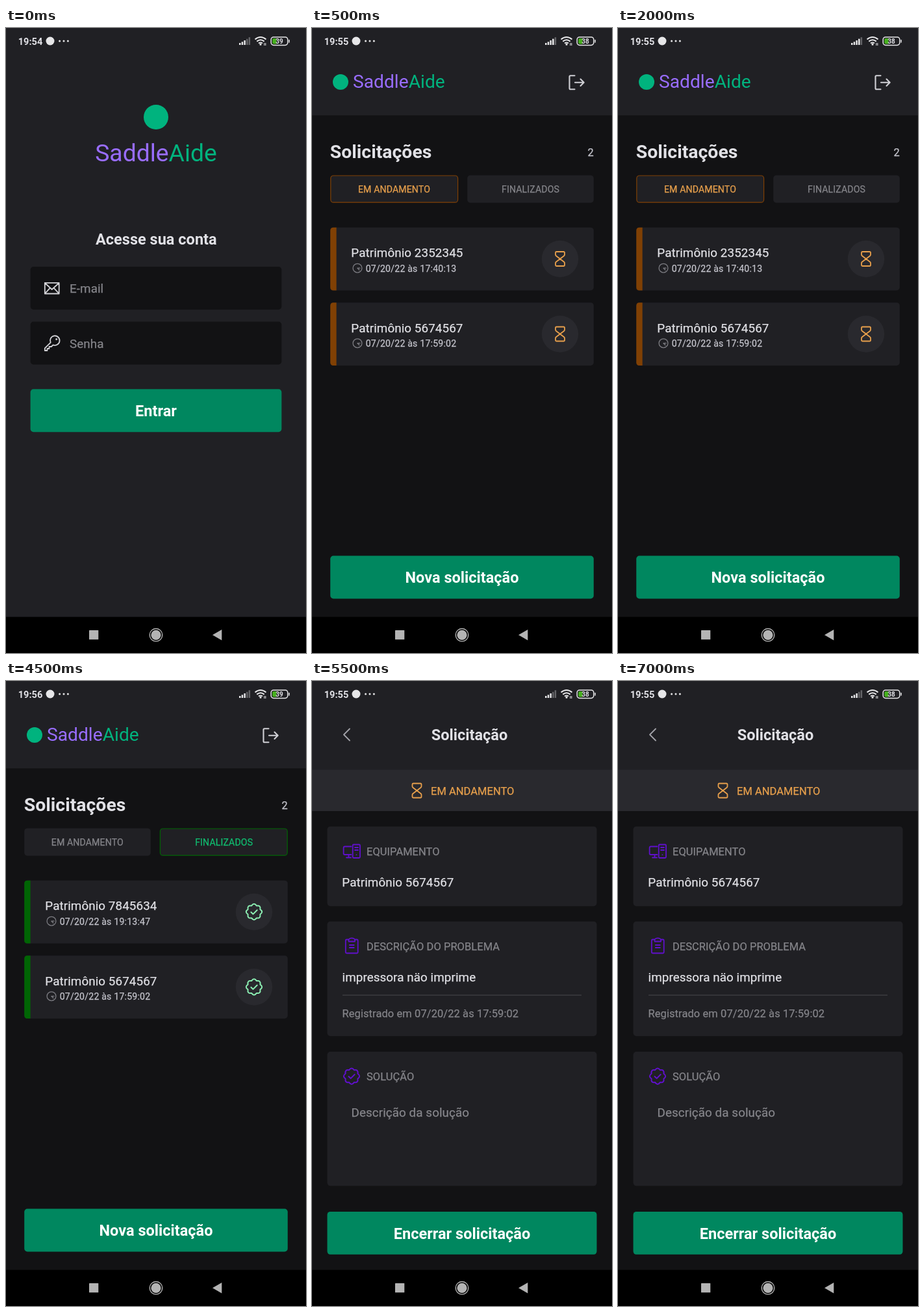
Animation, 462 px wide and 961 px high, one loop 8 s. Source, as an HTML page:

```html
<!DOCTYPE html>
<html lang="pt-BR">
<head>
<meta charset="utf-8">
<title>Solicitações</title>
<style>
html, body { margin: 0; width: 100%; height: 100%; overflow: hidden; background: #121214; }
svg { display: block; }
text { font-family: Roboto, sans-serif; color: #e1e1e6; fill: currentColor; }
.bold { font-weight: 700; }
.mid { text-anchor: middle; }
.xs, .sm, .md { stroke: currentColor; stroke-width: .25px; }
.xs { font-size: 14.12px; letter-spacing: .13px; }
.sm { font-size: 16.47px; letter-spacing: .06px; }
.md { font-size: 18.82px; letter-spacing: .08px; }
.xl { font-size: 23.53px; }
.time { font-size: 14.6px; }
.date { color: #c4c4cc; letter-spacing: .2px; }
.dim { color: #85858a; }
.cta { color: #fff; }
.amber { color: #e8a04c; }
.mint { color: #10bd70; }
.tint { fill: currentColor; }
.line { fill: none; stroke: currentColor; stroke-width: 1.8; stroke-linecap: round; stroke-linejoin: round; }
.panel { fill: #202024; }
.deep { fill: #121214; }
.green { fill: #00875f; }
.raised { fill: #29292e; }

.scene { opacity: 0; animation: 8s step-end infinite; }
.login { animation-name: login; }
.open { animation-name: open; }
.done { animation-name: done; }
.detail { animation-name: detail; }
@keyframes login { 0% { opacity: 1 } 6.25%, 100% { opacity: 0 } }
@keyframes open { 0% { opacity: 0 } 6.25% { opacity: 1 } 37.5%, 100% { opacity: 0 } }
@keyframes done { 0% { opacity: 0 } 37.5% { opacity: 1 } 68.75%, 100% { opacity: 0 } }
@keyframes detail { 0% { opacity: 0 } 68.75%, 100% { opacity: 1 } }
</style>
</head>
<body>
<svg width="462" height="961" viewBox="0 0 462 961">
  <defs>
    <g id="hourglass" class="line">
      <path d="M-5.5-11H5.5Q7-11 7-9.5V-6.4Q7-5.4 6.2-4.8L0 0L-6.2-4.8Q-7-5.4-7-6.4V-9.5Q-7-11-5.5-11Z"/>
      <path d="M-5.5 11H5.5Q7 11 7 9.5V6.4Q7 5.4 6.2 4.8L0 0L-6.2 4.8Q-7 5.4-7 6.4V9.5Q-7 11-5.5 11Z"/>
    </g>
    <g id="seal" class="line" style="stroke-width:2">
      <path d="M-3.9-9.4Q0-15 3.9-9.4Q10.6-10.6 9.4-3.9Q15 0 9.4 3.9Q10.6 10.6 3.9 9.4Q0 15-3.9 9.4Q-10.6 10.6-9.4 3.9Q-15 0-9.4-3.9Q-10.6-10.6-3.9-9.4Z"/>
      <path d="M-4.6.4L-1.4 3.4L4.7-2.7"/>
    </g>
    <g id="clock" class="line" color="#7c7c82" style="stroke-width:1.3">
      <circle r="6.9"/>
      <path d="M4 0H0L2.8 2.8"/>
    </g>

    <g id="card">
      <rect class="panel" x="28.2" width="405.6" height="96.7" rx="4.7"/>
      <path class="tint" d="M37.6 0V96.7H32.9Q28.2 96.7 28.2 92V4.7Q28.2 0 32.9 0Z"/>
      <circle class="raised" cx="382" cy="48.3" r="28.2"/>
      <use href="#clock" x="70" y="62.5"/>
    </g>
    <rect id="tab" class="panel" y="226.4" width="194.6" height="42.3" rx="4.7"/>
    <rect id="tab-on" class="panel" y="227" width="195.8" height="41.2" rx="4.2" stroke="currentColor" stroke-width="1.18"/>

    <g id="list">
      <rect class="deep" width="462" height="906"/>
      <rect class="panel" width="462" height="134.3"/>
      <circle cx="44" cy="83" r="12" fill="#00b37e"/>
      <text x="63" y="92" font-size="28.2"><tspan fill="#996dff">Saddle</tspan><tspan fill="#00b37e">Aide</tspan></text>
      <path class="line" color="#d0d0d5" style="stroke-width:2.1" d="M404.5 73.2H398Q396.5 73.2 396.5 74.7V92.8Q396.5 94.3 398 94.3H404.5M405 83.7H418.5M413.5 78.5L418.7 83.7L413.5 88.9"/>
      <text class="bold" x="27.8" y="200" font-size="28.4">Solicitações</text>
      <text class="sm" x="433.8" y="196.5" text-anchor="end" style="color:#c4c4cc">2</text>
      <use href="#card" y="306.7"/>
      <use href="#card" y="422.2"/>
      <rect class="green" x="28.2" y="811.5" width="405.6" height="65.9" rx="4.7"/>
      <text class="xl bold mid cta" x="231" y="853.3">Nova solicitação</text>
    </g>

    <g id="status" fill="#e6e6e8">
      <circle cx="68" cy="20" r="6.5"/>
      <circle cx="82.6" cy="20" r="1.5"/>
      <circle cx="89" cy="20" r="1.5"/>
      <circle cx="95.4" cy="20" r="1.5"/>
      <path d="M359 23h2.5v3h-2.5zM362.7 21.3h2.5v4.7h-2.5zM366.4 19h2.5v7h-2.5z"/>
      <path opacity=".35" d="M370 16.7h2.5v9.3h-2.5zM373.6 14.3h2.5v11.7h-2.5z"/>
      <g fill="none" stroke="#e6e6e8" stroke-width="2">
        <path d="M383.5 17.5Q392 10.5 400.5 17.5M386.3 20.6Q392 16 397.7 20.6M389 23.5Q392 21.3 395 23.5"/>
        <rect x="408.2" y="14" width="25.6" height="12.4" rx="3.8" stroke-width="1.5"/>
      </g>
      <circle cx="392" cy="25.3" r="1.5"/>
      <path d="M397.3 23h1v4h-1zM399.3 23h1v4h-1zM435.3 18h1.5v4.5h-1.5z"/>
      <path d="M412 16H416.5V24.4H412Q410.2 24.4 410.2 22.6V17.8Q410.2 16 412 16Z" fill="#46b01e"/>
    </g>
  </defs>

  <g class="scene login">
    <rect class="panel" width="462" height="906"/>
    <use href="#status"/>
    <text class="bold time" x="18.7" y="25.5">19:54</text>
    <text class="bold mid" x="421" y="24" font-size="10">39</text>
    <circle cx="231" cy="137" r="19" fill="#00b37e"/>
    <text class="mid" x="231" y="205" font-size="37.3"><tspan fill="#996dff">Saddle</tspan><tspan fill="#00b37e">Aide</tspan></text>
    <text class="xl bold mid" x="231.3" y="332.5">Acesse sua conta</text>
    <rect class="deep" x="37.6" y="367" width="386.8" height="65.9" rx="4.7"/>
    <rect class="deep" x="37.6" y="451.6" width="386.8" height="65.9" rx="4.7"/>
    <g class="line" color="#d2d2d6">
      <path d="M59.8 391.8H81.7V408.5H59.8ZM59.8 392L70.7 402L81.7 392M59.8 408.3L68 399.6M81.7 408.3L73.5 399.6"/>
      <path d="M68.7 483.7A7.3 7.3 0 1 1 72.5 487.3L69.8 490H66.5V493H63.5V496H59.8V492.3Z"/>
      <circle cx="77.7" cy="478.4" r=".6"/>
    </g>
    <text class="md dim" x="98" y="407.3">E-mail</text>
    <text class="md dim" x="98" y="491.8">Senha</text>
    <rect class="green" x="37.6" y="555.3" width="386.8" height="65.9" rx="4.7"/>
    <text class="xl bold mid cta" x="231" y="597">Entrar</text>
  </g>

  <g class="scene open">
    <use href="#list" color="#804004"/>
    <use href="#status"/>
    <path d="M370 16.7h2.5v9.3h-2.5z" fill="#e6e6e8"/>
    <text class="bold time" x="18.7" y="25.5">19:55</text>
    <text class="bold mid" x="421" y="24" font-size="10">38</text>
    <use href="#tab-on" x="28.8" color="#804004"/>
    <use href="#tab" x="239.2"/>
    <text class="xs mid amber" x="126.5" y="253.2">EM ANDAMENTO</text>
    <text class="xs mid dim" x="336.5" y="253.2">FINALIZADOS</text>
    <text class="md" x="60.3" y="352">Patrimônio 2352345</text>
    <text class="xs date" x="82.7" y="374.8">07/20/22 às 17:40:13</text>
    <text class="md" x="60.3" y="467.5">Patrimônio 5674567</text>
    <text class="xs date" x="82.7" y="490.3">07/20/22 às 17:59:02</text>
    <g class="amber">
      <use href="#hourglass" x="382" y="355"/>
      <use href="#hourglass" x="382" y="470.5"/>
    </g>
  </g>

  <g class="scene done">
    <use href="#list" color="#006504"/>
    <use href="#status"/>
    <text class="bold time" x="18.7" y="25.5">19:56</text>
    <text class="bold mid" x="421" y="24" font-size="10">39</text>
    <use href="#tab" x="28.2"/>
    <use href="#tab-on" x="237.4" color="#006504"/>
    <text class="xs mid dim" x="125.3" y="253.2">EM ANDAMENTO</text>
    <text class="xs mid mint" x="335.7" y="253.2">FINALIZADOS</text>
    <text class="md" x="60.3" y="352">Patrimônio 7845634</text>
    <text class="xs date" x="82.7" y="374.8">07/20/22 às 19:13:47</text>
    <text class="md" x="60.3" y="467.5">Patrimônio 5674567</text>
    <text class="xs date" x="82.7" y="490.3">07/20/22 às 17:59:02</text>
    <g color="#8cefb3">
      <use href="#seal" x="382" y="355"/>
      <use href="#seal" x="382" y="470.5"/>
    </g>
  </g>

  <g class="scene detail">
    <rect class="deep" width="462" height="906"/>
    <rect class="panel" width="462" height="137"/>
    <rect class="raised" y="136.5" width="462" height="63.5"/>
    <use href="#status"/>
    <text class="bold time" x="18.7" y="25.5">19:55</text>
    <text class="bold mid" x="421" y="24" font-size="10">38</text>
    <path class="line" color="#a4a4aa" d="M58 73.5L49 82.5L58 91.5"/>
    <text class="xl bold mid" x="242.5" y="91">Solicitação</text>
    <g class="amber"><use href="#hourglass" x="161.5" y="168.5"/></g>
    <text class="sm amber" x="183" y="174.8">EM ANDAMENTO</text>

    <rect class="panel" x="23.5" y="223.7" width="415" height="122.5" rx="4.7"/>
    <rect class="panel" x="23.5" y="369.7" width="415" height="176.3" rx="4.7"/>
    <rect class="panel" x="23.5" y="570" width="415" height="206.3" rx="4.7"/>
    <g class="line" color="#6010cc">
      <path d="M60.5 254.5H50.5Q48.6 254.5 48.6 256.4V265Q48.6 267 50.5 267H60.5M56.5 267V271.5M53 271.5H60"/>
      <rect x="62.7" y="251.5" width="11.3" height="20.5" rx="1.5"/>
      <path d="M66 256H71M66 260H71M68.4 267.2H68.5"/>
      <path d="M56.5 397.5H53.3Q51.8 397.5 51.8 399V417Q51.8 418.5 53.3 418.5H69.2Q70.7 418.5 70.7 417V399Q70.7 397.5 69.2 397.5H66M57.8 406H64.7M57.8 410H64.7M56.5 400.5V398.5A4.75 3.2 0 0 1 66 398.5V400.5Z"/>
      <use href="#seal" x="61" y="607.7"/>
    </g>
    <text class="sm dim" x="84" y="268.3">EQUIPAMENTO</text>
    <text class="md" x="46.3" y="316">Patrimônio 5674567</text>
    <text class="sm dim" x="84" y="414.3">DESCRIÇÃO DO PROBLEMA</text>
    <text class="md" x="46.5" y="461.8">impressora näo imprime</text>
    <rect x="47" y="482.5" width="368" height="1.1" fill="#444449"/>
    <text class="sm dim" x="46.5" y="517.3" style="letter-spacing:.1px">Registrado em 07/20/22 às 17:59:02</text>
    <text class="sm dim" x="84" y="614">SOLUÇÃO</text>
    <text class="md dim" x="60.5" y="669.8">Descrição da solução</text>
    <rect class="green" x="23.5" y="815.9" width="415" height="65.9" rx="4.7"/>
    <text class="xl bold mid cta" x="231" y="857.5">Encerrar solicitação</text>
  </g>

  <rect y="905.5" width="462" height="55.5"/>
  <g fill="#b4b4b4">
    <rect x="128" y="926" width="14.3" height="14.3" rx=".6"/>
    <circle cx="231" cy="933.3" r="7.6"/>
    <circle cx="231" cy="933.3" r="9.8" fill="none" stroke="#b4b4b4" stroke-width="1.4"/>
    <path d="M318 933.3L332.3 925V941.6Z"/>
  </g>
</svg>
</body>
</html>
```
